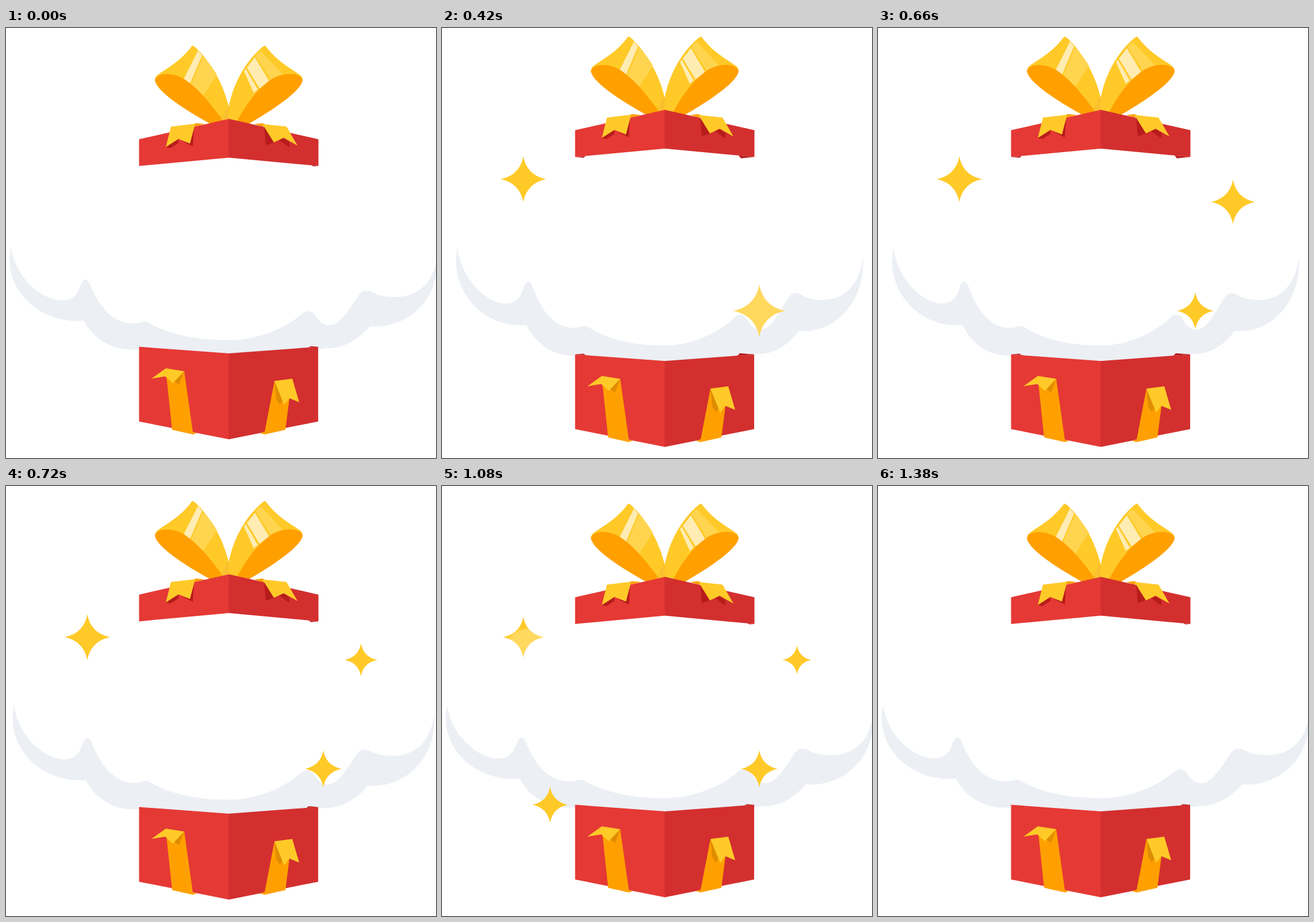
An HTML page for the animation above (1.8 s loop, 748 px wide and 748 px high).

```html
<!DOCTYPE html>
<html lang="en">
<head>
<meta charset="utf-8">
<title>Gift box</title>
<style>
  html, body { margin: 0; height: 100%; overflow: hidden; background: #fff; }
  svg { display: block; width: 100vw; height: 100vh; }
  .red { fill: #e53935; }
  .crimson { fill: #d32f2f; }
  .dark { fill: #b71c1c; }
  .gold { fill: #ffca28; }
  .orange { fill: #ffa000; }
  .amber { fill: #e08c00; }
  .light { fill: #ffd54f; }
  .cream { fill: #ffecb3; }
</style>
</head>
<body>
<svg viewBox="0 0 748 748">
  <defs>
    <path id="spark" d="M0-1C.1-.45 .45-.1 1 0C.45 .1 .1 .45 0 1C-.1 .45-.45 .1-1 0C-.45-.1-.1-.45 0-1Z"/>
    <clipPath id="sparkClip"><use href="#spark"/></clipPath>
  </defs>

  <path id="cloud" fill="#eceff4" d="M9 381C14 430 60 474 98 474C118 474 125 462 130 447C134 436 141 434 146 446
    C160 480 182 514 222 514C232 514 238 509 247 512C275 529 320 543 387 543C440 543 490 520 515 497
    C524 490 533 491 540 503C546 513 555 517 562 517C580 517 595 493 612 467C620 455 628 455 638 460
    C650 467 665 468 677 468C720 468 745 440 750 396C756 470 700 524 633 519C610 545 585 558 555 557
    L387 580L232 559C190 563 155 545 135 509C60 516-8 455 9 381Z"/>

  <g id="box">
    <path id="boxInside" class="dark"/>
    <path class="red" d="M231.5 554.5L388 566V715.5L231.5 684.5Z"/>
    <path class="crimson" d="M543 554.5L387.5 566V715.5L543 684.5Z"/>
    <path class="orange" d="M279 605L310 597L325 703L332 705L325 707L289 699Z"/>
    <path class="amber" d="M310 597L301 621L289 612Z"/>
    <path class="gold" d="M253 610L278 592L310 597L290 618L277 606Z"/>
    <path class="orange" d="M467 614L493 645L486 699L450 707L442 705L450 702Z"/>
    <path class="amber" d="M467 614L470 645L476 655L484 645Z"/>
    <path class="gold" d="M467 614L498 610L510 651L493 644L484 656Z"/>
  </g>

  <g id="lid">
    <path class="gold" d="M324 30.5C305 57 280 70 266 80Q259 84 259 91L356 167H422L516 91Q516 84 509 80
      C495 70 470 57 451 30.5Q448 31 445 34C415 60 395 98 387.5 137C380 105 362 65 330 34Q327 31 324 30.5Z"/>
    <path class="cream" d="M334 39L341 48L320 97L309 89Z"/>
    <path class="light" d="M343 50Q357 65 367 81L343 118L322 98Z"/>
    <path class="cream" d="M419 69L433 51L458 93L441 105ZM414 75L417 71L438 107L431 113Z"/>
    <path class="light" d="M434 48L443 40L482 81L461 91Z"/>
    <path class="orange" d="M259 91C262 76 295 76 316 93C345 115 365 145 379 162L356 167C310 142 262 110 259 91Z"/>
    <path class="orange" d="M516 91C513 76 480 76 459 91C434 109 416 136 402 162L422 167C465 142 513 110 516 91Z"/>
    <path fill="#fbc02d" d="M386 133L388 139L387 160H374Z"/>
    <path id="lidInside" class="dark"/>
    <path class="orange" d="M326 167L331 165.5L346 167L328 172ZM432 167L446 165.5L452 168L446 172Z"/>
    <path class="red" d="M231.5 193.5L388 158V225.5L231.5 240Z"/>
    <path class="crimson" d="M543.5 193.5L387.5 158V225.5L543.5 240Z"/>
    <path class="dark" d="M327 173L325 206L305 196L320 200ZM278 207L286 209L300 200V193Z"/>
    <path class="dark" d="M449 171L452 204L466 199ZM475 195L493 208V199L483 191Z"/>
    <path class="gold" d="M287 171.5L329 166.5L320 201L300 193L278 207Z"/>
    <path class="gold" d="M446 167L488 171.5L507 204.5L483 191L466 199Z"/>
  </g>

  <g id="stars"></g>
</svg>

<script>
const LOOP = 1800, STEP = 30;
const $ = id => document.getElementById(id);
const clamp = x => Math.min(1, Math.max(0, x));

const stars = [
  { x: 141.5, y: 263, size: 40, show: 165, hide: 1045 },
  { x: 552, y: 492, size: 32, show: 360, hide: 1120 },
  { x: 617.5, y: 302.5, size: 25, show: 555, hide: 1190 },
  { x: 188, y: 554.5, size: 31, show: 750, hide: 1230 }
];
for (const star of stars) {
  $('stars').insertAdjacentHTML('beforeend', `<g><use href="#spark" class="gold"/>
    <circle cx=".24" cy=".75" fill="#fff" opacity=".25" clip-path="url(#sparkClip)"/></g>`);
  star.node = $('stars').lastElementChild;
  star.shine = star.node.querySelector('circle');
}

function drawStar({ x, y, size, show, hide, node, shine }, t) {
  const rise = clamp((t - show) / 90), fall = clamp((t - show - 90) / 90);
  const gone = clamp((t - hide) / 150);
  const pop = 1.6 * (1 - (1 - rise) ** 2) - 0.6 * fall ** 1.4;
  const scale = size * pop * (1 - gone ** 1.5);
  node.style.display = scale > 0 ? '' : 'none';
  node.setAttribute('transform', `translate(${x} ${y}) scale(${scale})`);
  shine.setAttribute('r', gone > 0 ? 5 * gone : 2 * clamp((90 - t + show) / 30));
}

// Corners of an opening that the cloud leaves uncovered
function inside(y, front, back, left, right) {
  const corner = (x, edge, dir) => {
    const d = Math.max(0, (edge - x) * dir);
    return `M${x} ${y}L${edge + 2 * dir} ${y + front * (d + 2)}L${edge - 2 * dir} ${y + back * Math.max(0, d - 2)}Z`;
  };
  return (left > 232 ? corner(232, left, 1) : '') + corner(543, right, -1);
}

function draw(t) {
  const p = t > 300 && t < 780 ? (1 - Math.cos((t - 300) / 240 * Math.PI)) / 2 : 0;
  $('lid').setAttribute('transform', `translate(0 ${-31.3 * p})`);
  $('box').setAttribute('transform', `translate(0 ${26.5 * p})`);
  $('cloud').setAttribute('transform',
    `translate(380 381) scale(${1 - 0.097 * p} ${1 + 0.116 * p}) translate(-380 -381)`);
  const left = 230 + 36 * p;
  $('lidInside').setAttribute('d', inside(240, -0.095, 0.1, left, 533 - 30 * p));
  $('boxInside').setAttribute('d', inside(554.5, 0.075, -0.085, left, 528 - 24 * p));
  for (const star of stars) drawStar(star, t);
}

function tick() {
  draw(Math.floor(performance.now() % LOOP / STEP) * STEP);
  requestAnimationFrame(tick);
}
tick();
</script>
</body>
</html>
```
